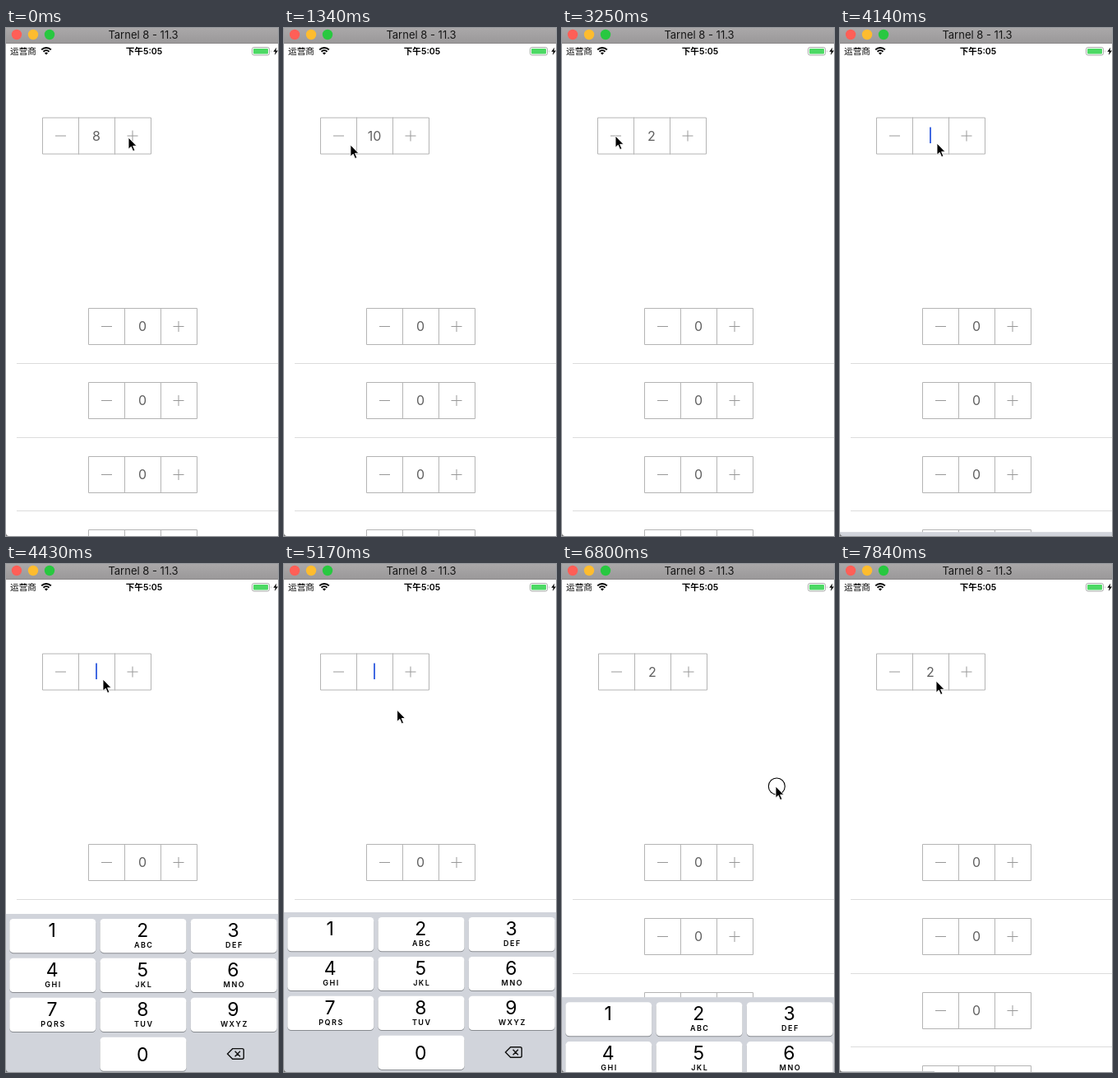
Write an HTML page that moves like this. It is 331 px wide and 617 px high and loops after 7.99 s.

```html
<!DOCTYPE html>
<html lang="zh">
<head>
<meta charset="utf-8">
<title>Stepper demo</title>
<style>
html, body { margin: 0; width: 331px; height: 617px; overflow: hidden; background: #fff; }
svg { display: block; font-family: Inter, Roboto, sans-serif; text-anchor: middle; }
.cjk { font-family: Inter, "Noto Sans CJK SC", "Noto Sans CJK", sans-serif; font-size: 10.6px; }
.stepper path { fill: none; stroke: #b4b4b4; }
.stepper path.sign { stroke: #999; }
.stepper text { font-size: 16px; fill: #606060; }
.digit { font-size: 23px; }
.letters { font-size: 9px; font-weight: 600; letter-spacing: 1.5px; }
</style>
</head>
<body>
<svg width="331" height="617" viewBox="0 0 331 617">
  <defs>
    <linearGradient id="bar" x2="0" y2="1">
      <stop stop-color="#aaa8a9"/><stop offset="1" stop-color="#9a9899"/>
    </linearGradient>
  </defs>
  <rect width="331" height="19" fill="url(#bar)"/>
  <path d="M0 18.5H331" stroke="#8b898a"/>
  <circle cx="13" cy="8" r="6.2" fill="#ff5f57"/>
  <circle cx="33" cy="8" r="6.2" fill="#febc2e"/>
  <circle cx="53" cy="8" r="6.2" fill="#28c840"/>
  <text x="167" y="13" font-size="13" fill="#161616">Tarnel 8 - 11.3</text>

  <text class="cjk" x="21" y="32">运营商</text>
  <g fill="none" stroke="#000" stroke-width="1.9">
    <path d="M43.2 26.4A8.1 8.1 0 0 1 54.8 26.4M45.5 28.7A5 5 0 0 1 52.5 28.7"/>
    <path d="M49 32.5L47 30.4A2.8 2.8 0 0 1 51 30.4Z" fill="#000" stroke="none"/>
  </g>
  <text class="cjk" x="168" y="32" font-weight="600">下午5:05</text>
  <rect x="299.5" y="23.5" width="21" height="9.5" rx="2.3" fill="none" stroke="#aaa"/>
  <rect x="301" y="25" width="18" height="6.5" rx="1" fill="#4cd964"/>
  <path d="M322 26.5q1.4 1.7 0 3.5z" fill="#aaa"/>
  <path d="M329.3 23.5L325.3 28.8H327.8L326.8 33L331 27.5H328.4Z"/>

  <g id="list"></g>
  <g id="main"></g>
  <path id="caret" d="M0 120.5V140" stroke="#4169e1" stroke-width="2"/>
  <g id="keys"></g>
  <path id="edge" d="M0 616.5H115" stroke="#c6c8cc"/>
  <path d="M0 613.5Q.4 616.6 3.5 617H0Z" fill="#777"/>
  <g id="pointer">
    <circle id="ring" cx="1.3" cy="0" r="10" fill="none" stroke="#000" stroke-width="1.1"/>
    <path d="M0 0V14.2L3.3 11.2L5.6 16.6L7.9 15.6L5.6 10.3H10Z" stroke="#fff" stroke-width=".9"/>
  </g>
</svg>
<script>
const LOOP = 7990, KEYS_Y = 423, KEYS_H = 194;
const FOCUS = 3990, TYPED = 6060, BLUR = 6700;
const $ = id => document.getElementById(id);

const stepper = (x, y, value) => `<g class="stepper" transform="translate(${x} ${y})">
  <path d="M.5 .5H132.5V44.5H.5ZM44.5 0V45M88.5 0V45"/>
  <path class="sign" d="M16 22.5H29M103.5 22.5H116.5M110 16V29"/>
  <text x="66" y="28">${value}</text></g>`;

$('list').innerHTML = [340, 430, 519.6, 609.2].map((y, i) =>
  stepper(100, Math.round(y), 0) +
  `<path d="M13 ${[407, 497, 586, 676][i] + .5}H331" stroke="#dcdcdc"/>`).join('');
$('main').innerHTML = stepper(44, 108.5, 8);
const value = $('main').querySelector('text');

// Number pad, laid out from its own top-left corner
function keypad() {
  const letters = ['', 'ABC', 'DEF', 'GHI', 'JKL', 'MNO', 'PQRS', 'TUV', 'WXYZ'];
  const key = (col, row, digit, sub) => {
    const x = 4.3 + col * 110.2, y = 6 + row * 47.9, mid = x + 52.5;
    return `<rect x="${x}" y="${y + 1}" width="105" height="41.2" rx="4.5" fill="#888b90"/>
      <rect x="${x}" y="${y}" width="105" height="41.2" rx="4.5" fill="#fff"/>
      <text class="digit" x="${mid - .7}" y="${y + (sub === null ? 29 : 22.3)}">${digit}</text>
      <text class="letters" x="${mid + .7}" y="${y + 35}">${sub || ''}</text>`;
  };
  return `<rect width="331" height="${KEYS_H + 4}" fill="#d1d4db"/>` +
    letters.map((s, i) => key(i % 3, Math.floor(i / 3), i + 1, s)).join('') +
    key(1, 3, 0, null) +
    `<path d="M269.5 170L275.7 163.7H287.3Q289.3 163.7 289.3 165.7V174.3Q289.3 176.3 287.3 176.3H275.7Z
      M278.6 166.8L285 173.2M285 166.8L278.6 173.2" fill="none" stroke="#111" stroke-width="1.4"/>`;
}
$('keys').innerHTML = keypad();

// Pointer stops: time, x, y
const route = [
  [0, 149, 133], [1190, 149, 133], [1340, 81, 142], [1500, 65, 131], [3400, 65, 131],
  [3550, 97, 133], [3690, 112, 133], [3990, 118, 140], [5100, 118, 140], [5700, 284, 455],
  [5920, 284, 455], [6050, 284, 450], [6200, 284, 450], [6650, 260, 270], [7100, 260, 270],
  [7780, 117, 142], [LOOP, 117, 142]
];
function pointerAt(t) {
  const i = route.findIndex(p => p[0] > t);
  const [a, b] = [route[i - 1], route[i]];
  const k = (t - a[0]) / (b[0] - a[0]);
  return [1, 2].map(n => a[n] + (b[n] - a[n]) * k);
}

const between = (t, a, b) => t >= a && t < b;
const show = (id, on) => $(id).setAttribute('visibility', on ? 'visible' : 'hidden');
const move = (id, x, y) => $(id).setAttribute('transform', `translate(${x} ${y})`);

// Critically damped spring from 0 to 1
function spring(ms) {
  const w = Math.max(0, ms) * .022;
  return 1 - (1 + w) * Math.exp(-w);
}

// The box nudges toward the button pressed beyond its limit
function nudge(t) {
  const bounce = start => between(t, start, start + 900)
    ? Math.round(3 * Math.abs(Math.sin(Math.PI * (t - start) / 300))) : 0;
  return bounce(370) - bounce(2620);
}

function label(t) {
  if (between(t, FOCUS, BLUR)) return t < TYPED ? '' : 3;
  if (t < 150) return 8;
  return Math.max(2, 10 - 2 * Math.max(0, Math.floor((t - 1400) / 240)));
}

function draw(t) {
  value.textContent = label(t);
  move('main', nudge(t), 0);

  const blinkOn = t < TYPED ? (t - FOCUS + 10) % 890 < 600 : true;
  show('caret', between(t, FOCUS, BLUR) && blinkOn);
  move('caret', t < TYPED ? 110 : 115, 0);

  const raised = spring(t - 4130) - spring(t - 6720);
  move('keys', 0, KEYS_Y + KEYS_H * (1 - raised));
  show('edge', t >= 7100);

  move('pointer', ...pointerAt(t));
  show('ring', between(t, TYPED, 6350) || between(t, 6650, 6950));
}

const begin = performance.now();
function tick() {
  draw((performance.now() - begin) % LOOP);
  requestAnimationFrame(tick);
}
tick();
</script>
</body>
</html>
```
